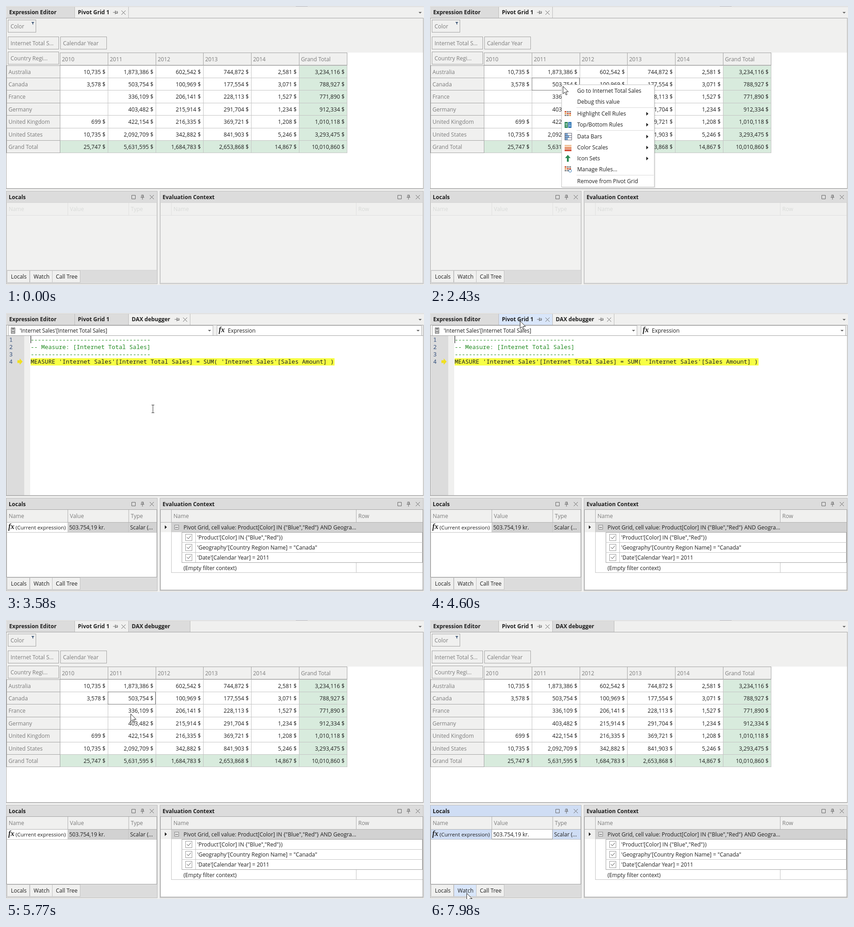
Animation of 916x611 px, one loop 8000 ms. Source, as an HTML page with a canvas:

```html
<!DOCTYPE html>
<html lang="en">
<head>
<meta charset="utf-8">
<title>Debugging a pivot value</title>
<style>
html, body { margin: 0; width: 100%; height: 100%; overflow: hidden; background: #f0f0ef; }
canvas { display: block; }
</style>
</head>
<body>
<canvas id="stage" width="916" height="611"></canvas>
<script>
const ctx = document.getElementById('stage').getContext('2d');
const SANS = '"Open Sans", "Noto Sans", sans-serif';
const MONO = '12.89px "Noto Sans Mono", "Liberation Mono", monospace';
const LIGHT = '#f0f0ef', GRAY = '#dcdcdc', LINE = '#a3a3a3', GRID = '#c4c4c4';
const INK = '#1e1e1e', DIM = '#7b7b7b', ICON = '#666';
const BLUE = '#cfddf4', HOVER = '#d9e6fa', GREEN = '#d8ebdd';

// Time of each state change in ms
const LOOP = 8000, SELECT = 1770, MENU = 1970, MENU_END = 2900, START = 3040,
      EDITOR = 3250, BACK = 4750, LOCALS = 6230;

// Pointer moves between rests, each eased in and out
const ENTER = { x: 827, y: 555 };
const MOVES = [
  { from: 260, to: 1030, x: 299, y: 200 },
  { from: 1080, to: 1360, x: 285, y: 172 },
  { from: 1490, to: 1770, x: 288, y: 172 },
  { from: 2340, to: 2840, x: 322, y: 210 },
  { from: 3580, to: 4280, x: 200, y: 8 },
  { from: 4530, to: 4600, x: 197, y: 17 },
  { from: 4750, to: 5480, x: 284, y: 166 },
  { from: 5700, to: 6020, x: 196, y: 477 },
  { from: 6560, to: 7030, x: 211, y: 464 },
  { from: 7280, to: 7980, x: 80, y: 598 }
];

const YEARS = ['2010', '2011', '2012', '2013', '2014', 'Grand Total'];
const SALES = {
  'Australia': [10735, 1873386, 602542, 744872, 2581],
  'Canada': [3578, 503754.19, 100969.3, 177554.4, 3071],
  'France': [0, 336109, 206141, 228113, 1527],
  'Germany': [0, 403482, 215914, 291704, 1234],
  'United Kingdom': [699, 422154.4, 216335, 369721.4, 1208],
  'United States': [10735, 2092709, 342882, 841903, 5246]
};
const sum = list => list.reduce((a, b) => a + b, 0);
SALES['Grand Total'] = YEARS.slice(0, 5).map((_, i) => sum(Object.values(SALES).map(row => row[i])));
const money = value => Math.round(value).toLocaleString('en-US') + ' $';

function rect(x, y, w, h, fill) {
  ctx.fillStyle = fill;
  ctx.fillRect(x, y, w, h);
}
function box(x, y, w, h, fill, stroke) {
  rect(x, y, w, h, fill);
  ctx.strokeStyle = stroke;
  ctx.lineWidth = 1;
  ctx.strokeRect(x + 0.5, y + 0.5, w - 1, h - 1);
}
function write(s, x, mid, color = INK, font = 12, align = 'left') {
  ctx.font = typeof font === 'number' ? `${font}px ${SANS}` : font;
  ctx.fillStyle = color;
  ctx.textAlign = align;
  ctx.fillText(s, x, mid + 4.3);
}
const bold = (s, x, mid) => write(s, x, mid, INK, `bold 12px ${SANS}`);
const fx = (x, mid) => write('fx', x, mid, INK, 'italic bold 16px "Liberation Serif", serif');

// Draws an SVG path at a position; a stroke is used when no fill is given
function shape(x, y, d, fill, stroke) {
  const path = new Path2D(d);
  ctx.save();
  ctx.translate(x, y);
  ctx.lineWidth = 1;
  if (fill) { ctx.fillStyle = fill; ctx.fill(path); }
  if (stroke) { ctx.strokeStyle = stroke; ctx.stroke(path); }
  ctx.restore();
}
const down = (x, y) => shape(x, y, 'M-3.5-1.5h7L0 2z', ICON);
const right = (x, y) => shape(x, y, 'M-2-4L2.5 0L-2 4z', INK);
const cross = (x, y) => shape(x, y, 'M-4.5-4.5l9 9m0-9l-9 9', null, ICON);
const pinUp = (x, y) => shape(x, y, 'M-2 .5v-5h4v5m-1 0v-5M-4 .5h8M0 .5v5', null, ICON);
const pinSide = (x, y) => shape(x, y, 'M-.5-2h5v4h-5m0-1h5M-.5-4v8M-.5 0h-5', null, ICON);

function tab(name, x, end, active, hover) {
  rect(x, 2, end - x, 24, hover ? HOVER : active ? LIGHT : GRAY);
  rect(end, 2, 1, 24, '#bcbcbc');
  bold(name, x + 6.5, 14);
  if (active || hover) {
    pinSide(end - 28, 14);
    cross(end - 10.5, 14.5);
  }
}
function tabs(t, hover) {
  rect(0, 1, 916, 1, '#d2d2d2');
  const debugging = t >= START && t < BACK;
  tab('Expression Editor', 0.5, 150, false);
  tab('Pivot Grid 1', 151, 268, !debugging, hover);
  if (t >= START) tab('DAX debugger', 269, 403, debugging);
  down(907.5, 14.5);
}

function field(name, x, y, w) {
  box(x, y, w, 28, LIGHT, LINE);
  write(name, x + 6, y + 15, DIM);
}
function pivot(selected) {
  rect(1, 27, 913, 75, LIGHT);
  rect(1, 102, 118, 28, LIGHT);
  field('Color', 4, 30, 62);
  shape(55.5, 35, 'M0 0h6.5L4 3v3L2.5 5V3z', '#3f5878');
  field('Internet Total S...', 4, 67, 112);
  field('Calendar Year', 119, 67, 102);
  field('Country Regi...', 4, 100, 112);

  const colX = i => Math.round(118 + 104.8 * i);
  const rowY = i => Math.round(129.6 + 27.4 * i);
  YEARS.forEach((year, i) => {
    box(colX(i), 102, colX(i + 1) - colX(i) + 1, 28, LIGHT, LINE);
    write(year, colX(i) + 4.5, 116.5, DIM);
  });
  Object.entries(SALES).forEach(([country, sales], r) => {
    const y = rowY(r), h = rowY(r + 1) - y + 1;
    [...sales, sum(sales)].forEach((value, c) => {
      const x = colX(c), w = colX(c + 1) - x + 1;
      box(x, y, w, h, r === 6 || c === 5 ? GREEN : '#fff', GRID);
      if (value) write(money(value), x + w - 6, y + 14.2, INK, 12.2, 'right');
    });
    box(1, y, 118, h, LIGHT, LINE);
    write(country, 5.5, y + 14.2, DIM);
  });
  rect(118, 129, 630, 1, LINE);
  if (selected) {
    ctx.strokeStyle = '#777';
    ctx.strokeRect(223.5, 157.5, 104, 27);
  }
}

function combo(x) {
  box(x, 27, 449, 23, '#fff', '#b4b4b4');
  down(x + 441, 38.5);
}
function editor(t) {
  rect(1, 27, 913, 23, LIGHT);
  combo(5);
  combo(462);
  rect(1, 49, 913, 1, LINE);
  box(11, 32, 9, 13, '#fff', '#444');
  shape(13, 34, 'M0 0h5v2h-5zM0 4h1v5h-1zM2 4h1v5h-1zM4 4h1v5h-1z', '#444');
  write("'Internet Sales'[Internet Total Sales]", 30, 38.5, INK, 11.7);
  fx(466, 37.5);
  write('Expression', 486, 38.5);

  rect(1, 50, 39, 350, GRAY);
  rect(40, 50, 13, 350, LIGHT);
  rect(54, 99, 666, 16, '#f7ff45');
  const rule = '-'.repeat(34);
  [rule, '-- Measure: [Internet Total Sales]', rule,
    "MEASURE 'Internet Sales'[Internet Total Sales] = SUM( 'Internet Sales'[Sales Amount] )"
  ].forEach((code, i) => {
    const mid = 58.3 + 16 * i;
    write(String(i + 1), 7, mid, '#35507c', MONO);
    write(code, 54, mid, i < 3 ? '#1f8a1f' : INK, MONO);
  });
  shape(25, 106.5, 'M0-3h5v-4l6.5 7l-6.5 7v-4h-5z', '#f0e020');
  if (Math.floor((t - 3190) / 530) % 2 === 0) rect(54, 50, 1, 16, '#000');
}

function panel(title, x, w, on, color, columns) {
  const end = x + w, bottom = x ? 607 : 579, line = on ? '#b0b0b0' : '#e0e0e0';
  box(x, 405, w, 204, GRAY, '#bdbdbd');
  rect(x + 1, 406, w - 2, 24, color);
  bold(title, x + 6, 419);
  shape(end - 56.5, 414.5, 'M0 0h8v8h-8z', null, ICON);
  pinUp(end - 33, 418.5);
  cross(end - 12.5, 418.5);
  box(x + 1, 430, w - 2, bottom - 430, on ? '#fff' : '#f1f1f0', on ? LINE : '#d4d4d4');
  rect(x + 2, 431, w - 4, 27, LIGHT);
  rect(x + 2, 458, w - 4, 1, line);
  columns.forEach(([name, cx], i) => {
    if (i) rect(cx - 5, 431, 1, 27, line);
    write(name, cx, 445, on ? DIM : '#d8dad8');
  });
}

function locals(on, full, active, hover) {
  panel('Locals', 0, 332, on, active ? BLUE : GRAY, [['Name', 6], ['Value', 140], ['Type', 273.5]]);
  if (full) {
    if (active) rect(2, 459, 328, 21, BLUE);
    else rect(136, 459, 194, 21, '#d2d2d2');
    rect(2, 480, 328, 1, GRID);
    rect(135, 459, 1, 21, GRID);
    rect(268, 459, 1, 21, GRID);
    if (active) box(135, 458, 134, 22, '#fff', LINE);
    fx(5, 468.5);
    write('(Current expression)', 21, 469.5, INK, 11.6);
    write('503.754,19 kr.', 138.5, 469.5);
    write('Scalar (...', 272, 469.5);
  }
  [['Locals', 3, 49], ['Watch', 53, 49], ['Call Tree', 102, 61]].forEach(([name, x, w]) => {
    box(x - 1, 579, w + 1, 27, name === 'Watch' && hover ? HOVER : LIGHT, '#c2c2c2');
    write(name, x + w / 2 + 0.5, 592.5, INK, 12, 'center');
  });
}

function context(on, full) {
  panel('Evaluation Context', 337, 578, on, GRAY, [['', 343], ['Name', 367], ['Row', 772]]);
  if (!full) return;
  rect(339, 459, 23, 21, LIGHT);
  right(350, 469);
  rect(362, 459, 551, 21, '#d2d2d2');
  box(369, 464, 10, 10, '#e6e6e6', '#888');
  rect(371, 469, 6, 1, '#444');
  write('Pivot Grid, cell value: Product[Color] IN {"Blue","Red"} AND Geogra...', 389, 469.5);
  box(385, 480, 528, 67, '#fff', LINE);
  ["'Product'[Color] IN {\"Blue\",\"Red\"})", "'Geography'[Country Region Name] = \"Canada\"",
    "'Date'[Calendar Year] = 2011"].forEach((filter, i) => {
    const mid = 492 + 21.8 * i;
    if (i) rect(385, Math.round(mid - 11.5), 528, 1, GRID);
    box(393, Math.round(mid) - 8, 15, 15, '#fff', '#999');
    shape(396.5, mid - 1, 'M0 0l3 3.5l5.5-6.5', null, '#444');
    write(filter, 419, mid);
  });
  rect(415, 480, 1, 66, GRID);
  write('(Empty filter context)', 389, 558.5);
  rect(362, 568, 551, 1, GRID);
  rect(362, 459, 1, 110, GRID);
  rect(767, 547, 1, 21, GRID);
}

function tiles(y) {
  for (let i = 0; i < 9; i++)
    rect(295 + i % 3 * 5, y - 6 + Math.floor(i / 3) * 4, 4, 3, ['#8d8d8d', '#d2613f', '#e2a45f'][(i * 2 + 1) % 5 % 3]);
}
const ICONS = {
  'Highlight Cell Rules': tiles,
  'Top/Bottom Rules': y => {
    rect(295, y - 6, 7, 13, '#2f8a5b');
    rect(303, y - 6, 7, 13, '#2e75b5');
    shape(298.5, y, 'M0 5v-8l-2 2m2-2l2 2M8-4v8l-2-2m2 2l2-2', null, '#fff');
  },
  'Data Bars': y => {
    for (let i = 0; i < 3; i++) {
      box(295, y - 8 + 5 * i, 16, 6, '#fff', '#667');
      rect(296, y - 7 + 5 * i, 6 + 3 * (i % 2), 4, '#7ba7d3');
    }
  },
  'Color Scales': y => ['#f2c6a0', '#e58a5e', '#d2553f'].forEach((c, i) => rect(295, y - 6 + 5 * i, 15, 4, c)),
  'Icon Sets': y => shape(302, y, 'M0-8l6 7h-4v8h-4v-8h-4z', '#2c8c57'),
  'Manage Rules...': y => {
    tiles(y - 1);
    shape(307, y + 3, 'M-3 0a3 3 0 1 0 6 0a3 3 0 1 0-6 0', '#fff', '#2e75b5');
  }
};
const MENU_GROUPS = [
  ['Go to Internet Total Sales', 'Debug this value'],
  ['Highlight Cell Rules', 'Top/Bottom Rules'],
  ['Data Bars', 'Color Scales', 'Icon Sets', 'Manage Rules...'],
  ['Remove from Pivot Grid']
];
function menu(alpha) {
  ctx.save();
  ctx.globalAlpha = alpha;
  rect(290, 174, 204, 224, 'rgba(0,0,0,.09)');
  box(288, 172, 204, 225, '#fff', '#c0c0c0');
  let y = 186;
  MENU_GROUPS.forEach((group, g) => {
    if (g) rect(321, y - 14, 169, 1, '#dadada');
    for (const name of group) {
      write(name, 322.5, y);
      if (ICONS[name]) ICONS[name](y);
      if (ICONS[name] && !name.endsWith('...')) right(476, y);
      y += 24;
    }
    y += 2;
  });
  ctx.restore();
}

function pointerAt(t) {
  if (t < MOVES[0].from) return null;
  let { x, y } = ENTER;
  for (const move of MOVES) {
    const k = Math.min(1, Math.max(0, (t - move.from) / (move.to - move.from)));
    const eased = k * k * (3 - 2 * k);
    x += (move.x - x) * eased;
    y += (move.y - y) * eased;
  }
  return { x, y };
}
function pointer({ x, y }, beam) {
  if (beam) shape(x, y, 'M0-8v16M-3-8.5h6M-3 8.5h6', null, '#333');
  else shape(x + 0.5, y + 0.5, 'M0 0v16.5l3.9-3.6l2.7 6.1l2.4-1l-2.6-6h5.3z', '#fff', '#222');
}

function draw(t) {
  const inEditor = t >= EDITOR && t < BACK, on = t >= START, full = t >= EDITOR;
  const tip = pointerAt(t);
  rect(0, 0, 916, 611, LIGHT);
  if (!inEditor) rect(635, 0, 26, 1, '#c9cad0');
  tabs(t, inEditor && tip.y < 27);
  rect(1, 27, 913, 373, '#fff');
  if (inEditor) editor(t);
  else pivot(t >= SELECT && t < LOCALS);
  ctx.strokeStyle = LINE;
  ctx.lineWidth = 1;
  ctx.strokeRect(0.5, 26.5, 914, 373);
  rect(0, 400, 915, 1, '#c8c8c8');
  locals(on, full, t >= LOCALS, tip && tip.y > 579 && tip.x > 53 && tip.x < 101);
  context(on, full);
  if (t >= MENU && t < MENU_END) menu(Math.min(1, 0.4 + (t - MENU) / 330));
  if (tip) pointer(tip, inEditor && tip.y > 50);
}

function frame() {
  draw(performance.now() % LOOP);
  requestAnimationFrame(frame);
}
frame();
</script>
</body>
</html>
```
